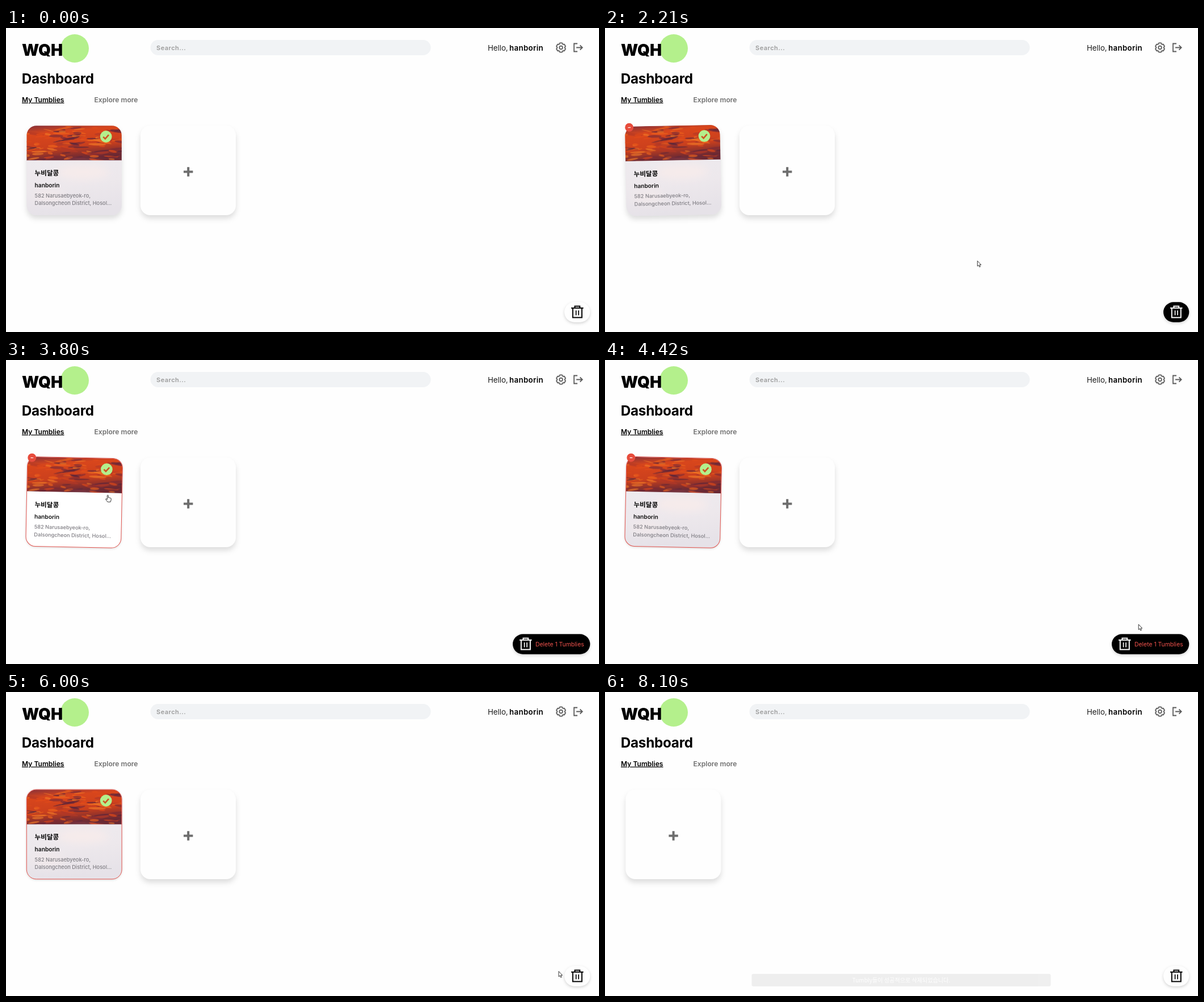
Animation, 1045 px wide and 536 px high, one loop 8170 ms. Source, as an HTML page:

```html
<!DOCTYPE html>
<html lang="en">
<head>
<meta charset="utf-8">
<title>Dashboard</title>
<style>
  html, body { margin: 0; width: 100%; height: 100%; overflow: hidden; background: #fefefe; }
  #stage { display: block; width: 1045px; height: 536px; font-family: Inter, sans-serif; }
  .ko { font-family: "Noto Sans CJK KR", "Noto Sans CJK", sans-serif; }
  .semi { font-weight: 600; }
  .shade { filter: drop-shadow(0 6px 5px rgba(0, 0, 0, .13)); }
  .near { filter: drop-shadow(0 1px 2px rgba(0, 0, 0, .18)); }
  .lift { filter: drop-shadow(0 2px 2.5px rgba(0, 0, 0, .17)); }
  .icon { fill: none; stroke: #5c5c5c; stroke-width: 1.8; }
</style>
</head>
<body>
<svg id="stage" viewBox="0 0 1045 536" xmlns="http://www.w3.org/2000/svg">
  <defs>
    <clipPath id="round"><rect x="36.5" y="172.3" width="167.3" height="157.7" rx="17"/></clipPath>
    <linearGradient id="sky" x1="0" y1="0" x2=".25" y2="1">
      <stop offset="0" stop-color="#84303a"/>
      <stop offset=".25" stop-color="#d8461c"/>
      <stop offset=".65" stop-color="#cb401d"/>
      <stop offset="1" stop-color="#6a2833"/>
    </linearGradient>
    <linearGradient id="haze" x1="0" y1="0" x2=".2" y2="1">
      <stop offset="0" stop-color="#eeeaee"/>
      <stop offset=".5" stop-color="#ede8ec"/>
      <stop offset="1" stop-color="#e6e2e8"/>
    </linearGradient>
    <filter id="soft" x="-50%" y="-50%" width="200%" height="200%"><feGaussianBlur stdDeviation="7"/></filter>
    <filter id="fuzz"><feGaussianBlur stdDeviation=".6"/></filter>
    <g id="plusCard">
      <rect class="shade" x="237" y="172.3" width="168" height="157.7" rx="17" fill="#fefefe"/>
      <path d="M313 253.5h16.4M321.2 245.3v16.4" stroke="#6d6d6d" stroke-width="4"/>
    </g>
  </defs>
  <rect width="1045" height="536" fill="#fefefe"/>

  <circle cx="121" cy="36" r="25" fill="#b4f08c"/>
  <text x="28" y="49" font-size="28" font-weight="900">WQH</text>
  <rect x="254.5" y="21" width="494" height="27" rx="13.5" fill="#f1f3f5"/>
  <text class="semi" x="265" y="38.5" font-size="11" letter-spacing=".5" fill="#9c9c9c">Search...</text>
  <text x="849" y="39.5" font-size="13.2" fill="#1c1c1c">Hello,</text>
  <text class="semi" x="887" y="39.5" font-size="13.2" letter-spacing=".4">hanborin</text>
  <path class="icon" id="gear" stroke-linejoin="round"/>
  <circle class="icon" cx="978" cy="34.5" r="2.8"/>
  <path class="icon" d="M1007 27.5h-6v14h6M1005 34.5h10.5M1011.5 30.3l4.2 4.2l-4.2 4.2"/>
  <text x="27.8" y="98" font-size="24.3" font-weight="700" letter-spacing="-.3">Dashboard</text>
  <text class="semi" x="28" y="130.7" font-size="12.1" text-decoration="underline">My Tumblies</text>
  <text class="semi" x="155.5" y="130.7" font-size="12.1" fill="#707070">Explore more</text>

  <use href="#plusCard" id="plusOld"/>
  <use href="#plusCard" id="plusNew" x="-200.6"/>

  <g id="card">
    <rect id="base" x="36.5" y="172.3" width="167.3" height="157.7" rx="17" fill="#e9e6ec"/>
    <g clip-path="url(#round)">
      <rect x="36" y="172" width="169" height="62" fill="url(#sky)"/>
      <g id="clouds" filter="url(#fuzz)"></g>
      <rect x="36" y="233.3" width="169" height="98" fill="url(#haze)"/>
      <g filter="url(#soft)">
        <ellipse cx="135" cy="254" rx="46" ry="13" fill="#f6ebeb"/>
        <ellipse cx="75" cy="296" rx="28" ry="12" fill="#f1e9eb"/>
      </g>
      <rect id="white" x="36" y="233.3" width="169" height="98" fill="#fff"/>
    </g>
    <text class="ko" x="50.6" y="260.4" font-size="11.6" font-weight="900">누비달콩</text>
    <text class="semi" x="50.6" y="281" font-size="10.2" fill="#111">hanborin</text>
    <g font-size="9.2" font-weight="500" fill="#7f7d83">
      <text x="50.6" y="298.6">582 Narusaebyeok-ro,</text>
      <text x="50.6" y="312.4">Dalsongcheon District, Hosol...</text>
    </g>
    <circle cx="176.2" cy="191.5" r="10.4" fill="#b4f08c"/>
    <path d="M171.3 191.8l3.5 3.5l6.2-7" fill="none" stroke="#cf5424" stroke-width="2.6"/>
    <rect id="border" x="36.3" y="172" width="167.8" height="157.9" rx="17" fill="none" stroke="#e2554f"/>
    <g id="badge">
      <circle cx="44.2" cy="173.8" r="7.5" fill="#e74c3c"/>
      <path d="M42 174h4.6" stroke="#fff" stroke-width="1.2"/>
    </g>
  </g>

  <rect id="pill" class="lift" y="483.3" height="35.4" rx="17.7"/>
  <svg id="inside" y="483" height="36">
    <g id="bin" fill="none" stroke-width="2">
      <path d="M12 10.7h21.5M18.4 10.7v-3.2h8.8v3.2M14.8 10.7v16.8h16v-16.8"/>
      <path d="M20.6 15v8.6M25 15v8.6" stroke-width="1.7"/>
    </g>
    <text id="label" x="40" y="21.8" font-size="10.4" fill="#f0524c">Delete 1 Tumblies</text>
  </svg>

  <g id="toast">
    <rect x="258.5" y="497" width="527" height="22" rx="3" fill="#333"/>
    <text class="ko" x="522" y="511.6" font-size="10.1" text-anchor="middle" fill="#fff">Tumbly들이 성공적으로 삭제되었습니다.</text>
  </g>

  <g id="cursor" fill="#fff" stroke="#222" stroke-width=".9" stroke-linejoin="round">
    <path id="arrow" d="M0 0v9.4l2.1-1.9l1.5 3.3l1.6-.7l-1.5-3.2h2.8z"/>
    <path id="hand" d="M-1 1q1-1.5 2 0v4q1-.9 1.8.2q1-.7 1.7.4q1-.4 1.3.7v2.7l-1.1 3.4h-5l-3-4q-.9-1.8.6-1.6l1.7 1.3z"/>
  </g>
</svg>
<script>
const LOOP = 8170, SHAKE = 1248, BEAT = 880, PICK = 3230, QUIT = 5640, DELETE = 6590;
const $ = id => document.getElementById(id);
const set = (id, attrs) => { for (const k in attrs) $(id).setAttribute(k, attrs[k]); };
const show = (id, on) => set(id, { opacity: +on });
const ramp = (t, a, b) => Math.min(1, Math.max(0, (t - a) / (b - a)));
const ease = (t, a, b) => { const p = ramp(t, a, b); return p * p * (3 - 2 * p); };

// Cursor tours: each is a list of time, x, y
const tours = [
  [[130, 1009, 527], [200, 1001, 514], [280, 993, 504], [660, 993, 504], [730, 1005.5, 499.5],
   [1940, 1005.5, 499.5], [2210, 657.5, 411], [2690, 114, 222], [2760, 110.5, 217.5],
   [3650, 110.5, 217.5], [4350, 917, 457], [4420, 940, 466], [4750, 1005, 500], [QUIT, 1005, 500]],
  [[5930, 974, 492.5], [DELETE, 974, 492.5]],
  [[7450, 1009, 505], [7660, 1012, 540]]
];

function slope(keys, i, c) {
  const a = keys[i - 1], k = keys[i], b = keys[i + 1];
  if (!a || !b || a[1] === k[1] || b[1] === k[1]) return 0;
  return (b[c] - a[c]) / (b[0] - a[0]);
}

function along(keys, t) {
  let i = 0;
  while (i < keys.length - 2 && t >= keys[i + 1][0]) i++;
  const a = keys[i], b = keys[i + 1], d = b[0] - a[0], u = (t - a[0]) / d, v = 1 - u;
  return [1, 2].map(c =>
    a[c] * (1 + 2 * u) * v * v + b[c] * u * u * (3 - 2 * u) +
    d * u * v * (slope(keys, i, c) * v - slope(keys, i + 1, c) * u));
}

function drawGear() {
  const pts = [];
  for (let k = 0; k < 6; k++)
    for (const [turn, r] of [[-30, 6.5], [-14, 8.3], [14, 8.3]]) {
      const a = (k * 60 + turn - 90) * Math.PI / 180;
      pts.push((978 + r * Math.cos(a)).toFixed(2) + " " + (34.5 + r * Math.sin(a)).toFixed(2));
    }
  set("gear", { d: "M" + pts.join("L") + "z" });
}

function drawClouds() {
  let seed = 11;
  const rnd = () => (seed = seed * 16807 % 2147483647) / 2147483647;
  const tones = ["#f0641c", "#7a2a36", "#e24a18", "#55233a", "#f27a26", "#b23826"];
  for (let i = 0; i < 110; i++) {
    const y = 174 + i * .53 + rnd() * 4;
    const x = 34 + rnd() * 172, w = 4 + rnd() * 13, h = .7 + rnd() * 1.7;
    const el = document.createElementNS("http://www.w3.org/2000/svg", "ellipse");
    const look = { cx: x, cy: y, rx: w, ry: h, fill: tones[i % 6], opacity: .65,
      transform: `rotate(${rnd() * 30 - 15} ${x} ${y})` };
    for (const k in look) el.setAttribute(k, look[k]);
    $("clouds").append(el);
  }
}

function drawCursor(t) {
  const keys = tours.find(k => t >= k[0][0] && t < k[k.length - 1][0]);
  show("cursor", !!keys);
  if (!keys) return false;
  const [x, y] = along(keys, t);
  const onCard = x > 36 && x < 204 && y > 172 && y < 330;
  const onPill = x > 984 && y > 483 && y < 519;
  set("cursor", { transform: `translate(${x.toFixed(2)} ${y.toFixed(2)})` });
  show("hand", onCard || onPill);
  show("arrow", !(onCard || onPill));
  return onCard;
}

function draw(t) {
  const hover = drawCursor(t);
  const editing = t >= 1190 && t < QUIT, picked = t >= PICK;
  const angle = t >= SHAKE && t < QUIT ? -2 * Math.sin((t - SHAKE) / BEAT * 2 * Math.PI) : 0;
  const gone = ease(t, DELETE, 6900);
  set("card", { transform: `rotate(${angle.toFixed(3)} 120.2 251.2)`, opacity: 1 - gone });
  set("base", { class: hover || picked ? "near" : "shade" });
  show("badge", editing);
  show("border", picked);
  show("white", hover);
  show("plusOld", 1 - gone);
  show("plusNew", gone);

  const dark = ramp(t, 1120, 1260) * (1 - ramp(t, 5590, 5710));
  const open = ease(t, PICK, 3500) * (1 - ease(t, 5570, 5710));
  const left = 984 - 91 * open, tone = Math.round(254 * (1 - dark)), ink = 254 - tone;
  set("pill", { x: left, width: 1029.3 - left, fill: `rgb(${tone},${tone},${tone})` });
  set("inside", { x: left, width: 1029.3 - left });
  set("bin", { stroke: `rgb(${ink},${ink},${ink})` });
  show("label", open > .15);
  set("toast", { opacity: ramp(t, DELETE, 6900) * (1 - ramp(t, 7400, 8155)) });
}

drawGear();
drawClouds();
function tick() {
  draw(performance.now() % LOOP);
  requestAnimationFrame(tick);
}
tick();
</script>
</body>
</html>
```
